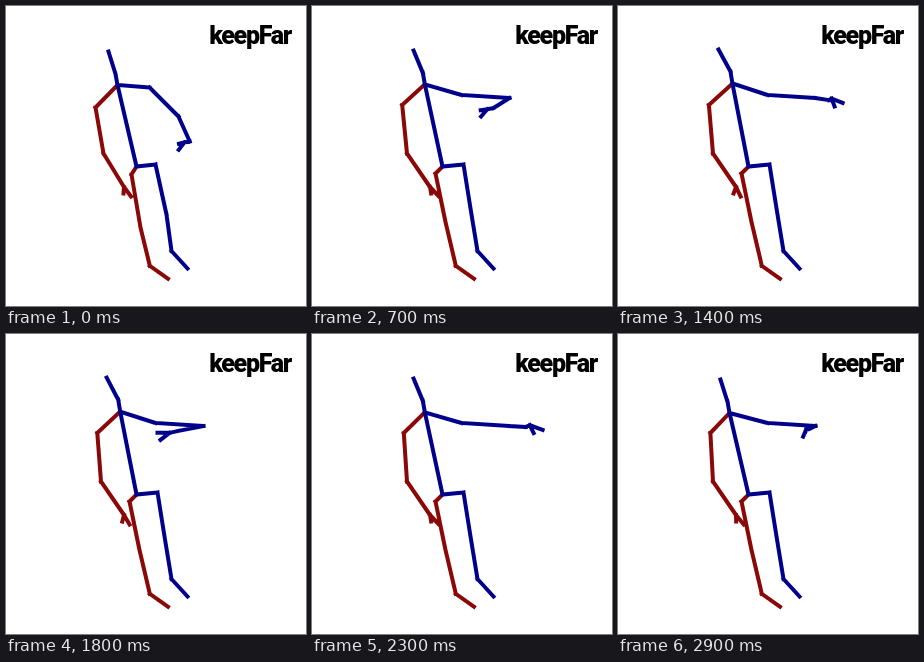
Write an HTML page that moves like this. It is 300x300 px and loops after 3000 ms.

```html
<!DOCTYPE html>
<html lang="en">
<head>
<meta charset="utf-8">
<title>keepFar</title>
<style>
  html, body { margin: 0; width: 100%; height: 100%; overflow: hidden; background: #fff; }
  svg { display: block; width: 300px; height: 300px; }
  path { fill: none; stroke-width: 4; stroke-linecap: square; }
  text { font: 900 25px Roboto, sans-serif; letter-spacing: -1.3px; text-anchor: middle; }
</style>
</head>
<body>
<svg viewBox="0 0 300 300">
  <g transform="translate(.5 .5)">
    <path id="right" stroke="#8b0808"/>
    <path id="left" stroke="#00008b"/>
  </g>
  <text x="244" y="37.5">keepFar</text>
</svg>
<script>
const LOOP = 3000, STEP = 100;
const right = document.getElementById("right");
const left = document.getElementById("left");

// How far the left hand is stretched out: 0 folded back, 1 fully extended
const reachKeys = [
  [0, .25], [400, -.05], [700, .2], [1200, .95], [1400, .85],
  [1800, 0], [2300, .92], [2400, 1], [2900, .42]
];

const mix = (a, b, k) => a + (b - a) * k;
const between = (from, to, k) => from.map((value, i) => mix(value, to[i], k));

function reachAt(time) {
  const i = Math.max(1, reachKeys.findIndex(key => key[0] >= time));
  const [t0, a] = reachKeys[i - 1], [t1, b] = reachKeys[i];
  return mix(a, b, (time - t0) / (t1 - t0));
}

// Bones are separate segments, so their caps overlap at the joints.
const chain = (...points) =>
  points.slice(1).map((point, i) => `M${points[i]}L${point}`).join("");

function draw(now) {
  const time = Math.floor(now % LOOP / STEP) * STEP;
  const settle = Math.min(time / 700, 1);
  const raise = settle ** 2;
  const lean = Math.sin(Math.PI * time / LOOP) ** 2;
  const wave = Math.sin(Math.PI * time / 1000);
  const reach = reachAt(time);
  const droop = 40 * Math.exp(-time / 380);

  const head = between([102, 45], [100, 43], lean);
  const neck = between([109, 67.5], [112, 65], lean);
  const chest = between([111, 78.5], [114, 77], lean);
  const pelvis = [130, 160];

  const shoulderR = [mix(89, 92, time / LOOP), mix(101, 98.5, settle)];
  const elbowR = [mix(97, 94.5, settle), 147];
  const wristR = [117.5, 180.5];
  const tipR = [124.5 + 2.5 * wave, 190];
  const thumbR = [117 + 2 * wave, 187];

  const shoulderL = between([143, 81], [149, 88.5], raise);
  const elbowL = between([172, 110], [197, 91.5], raise);
  const handPart = (folded, extended) => {
    const [x, y] = between(folded, extended, reach);
    return [x, y + droop];
  };
  const wristL = handPart([172, 96], [217, 92]);
  const handL = handPart([163, 98], [222, 90]);
  const tipL = handPart([151, 98], [237, 95]);
  const thumbL = handPart([154, 105], [227, 98]);

  const hipR = between([125, 168], [123, 167], settle);
  const kneeR = between([134, 221], [133, 215.5], settle);
  const hipL = [mix(149, 151, raise), 158];
  const kneeL = between([160, 208], [158.5, 205], settle);

  right.setAttribute("d",
    chain(chest, shoulderR, elbowR, wristR, tipR) + chain(wristR, thumbR) +
    chain(pelvis, hipR, kneeR, [143.3, 259.3], [161.5, 272.3]));
  left.setAttribute("d",
    chain(head, neck, chest, pelvis, hipL, kneeL, [165, 244.5], [181, 262]) +
    chain(chest, shoulderL, elbowL, wristL, handL, tipL) + chain(handL, thumbL));
}

const start = performance.now();
function tick() {
  draw(performance.now() - start);
  requestAnimationFrame(tick);
}
tick();
</script>
</body>
</html>
```
